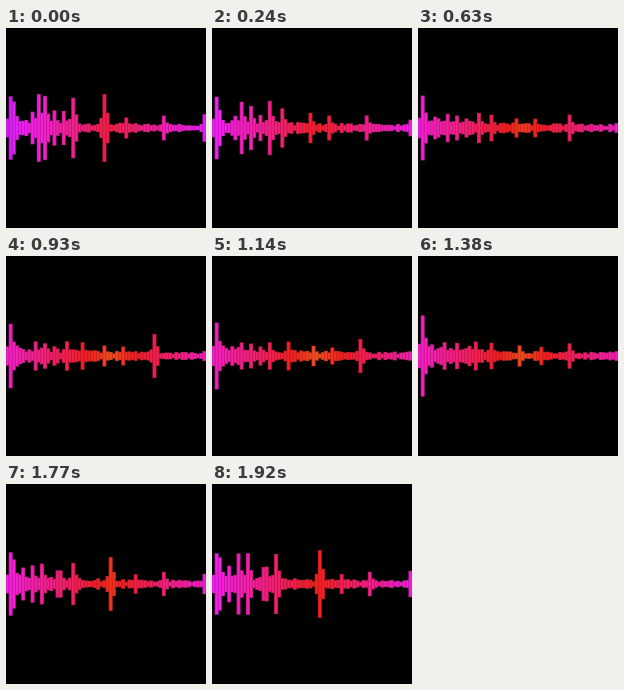
Animation, 200 px wide and 200 px high, one loop 1950 ms. Source, as an HTML page with a canvas:

```html
<!DOCTYPE html>
<html lang="en">
<head>
<meta charset="utf-8">
<title>Audio spectrum</title>
<style>
html, body { margin: 0; width: 100%; height: 100%; overflow: hidden; background: #000; }
canvas { display: block; width: 100vmin; height: 100vmin; }
</style>
</head>
<body>
<canvas id="stage" width="200" height="200"></canvas>
<script>
const ctx = document.getElementById('stage').getContext('2d');
const LOOP = 1950, STEP = 30, BARS = 64, PITCH = 200 / BARS, MID = 100;

// Each tone glides over bars start -> mid -> end and swells by gain around time at
const tone = (start, mid, end, low, gain, at) => ({ start, mid, end, low, gain, at });
const tones = [
  tone(1, 1, 1, 32, 10, 1400),
  tone(2, 2, 2, 15, 13, 1880),
  tone(8, 3, 5, 11, 7, 1850),
  tone(9.5, 8.8, 8, 14, 21, 80),
  tone(12, 12.3, 11, 13, 20, 30),
  tone(15, 15, 17, 10, 8, 0),
  tone(17.6, 19, 15.6, 14, 12, 240),
  tone(21.4, 24.4, 20, 14, 15, 0),
  tone(31, 31, 34, 10, 24, 1890),
  tone(37.6, 37, 41.6, 9, 4, 200),
  tone(50, 46.5, 50.5, 12, 10, 930),
  tone(63, 63, 63, 5, 9, 0)
];

const lerp = (a, b, p) => a + (b - a) * p;

function noise(a, b) {
  const s = Math.sin(a * 12.9898 + b * 78.233) * 43758.5453;
  return s - Math.floor(s);
}

function spectrum(time, frame) {
  const p = time / LOOP;
  const levels = Array.from({ length: BARS }, (_, i) =>
    (3.6 + 7.5 * Math.exp(-i / 20)) * (0.5 + 0.6 * noise(i, frame)));
  const raise = (i, h) => { if (i < BARS) levels[i] = Math.max(levels[i], h); };

  for (const { start, mid, end, low, gain, at } of tones) {
    const bar = Math.round(p < 0.5 ? lerp(start, mid, 2 * p) : lerp(mid, end, 2 * p - 1));
    const swell = Math.exp(4 * (Math.cos(2 * Math.PI * (time - at) / LOOP) - 1));
    const h = (low + gain * swell) * (0.94 + 0.12 * noise(low + start, frame));
    raise(bar, h);
    raise(bar - 1, h * 0.3);
    raise(bar + 1, h * 0.45);
  }
  return levels;
}

function drawBar(x, h, width, color) {
  ctx.fillStyle = color;
  ctx.fillRect(x - width / 2, MID - h, width, 2 * h);
}

function draw(t) {
  const frame = Math.floor(t / STEP), time = frame * STEP;
  const centerHue = 350 + 24 * Math.sin(0.85 * Math.PI * time / LOOP);

  ctx.fillStyle = '#000';
  ctx.fillRect(0, 0, 200, 200);
  spectrum(time, frame).forEach((h, i) => {
    const x = (i + 0.5) * PITCH;
    const hue = centerHue - 0.58 * Math.abs(x - 105);
    drawBar(x, h, 4, `hsl(${hue} 72% 42%)`);
    drawBar(x, h - 0.7, 2.4, `hsl(${hue} 92% 54%)`);
  });
}

const start = performance.now();
function tick() {
  draw((performance.now() - start) % LOOP);
  requestAnimationFrame(tick);
}
tick();
</script>
</body>
</html>
```
